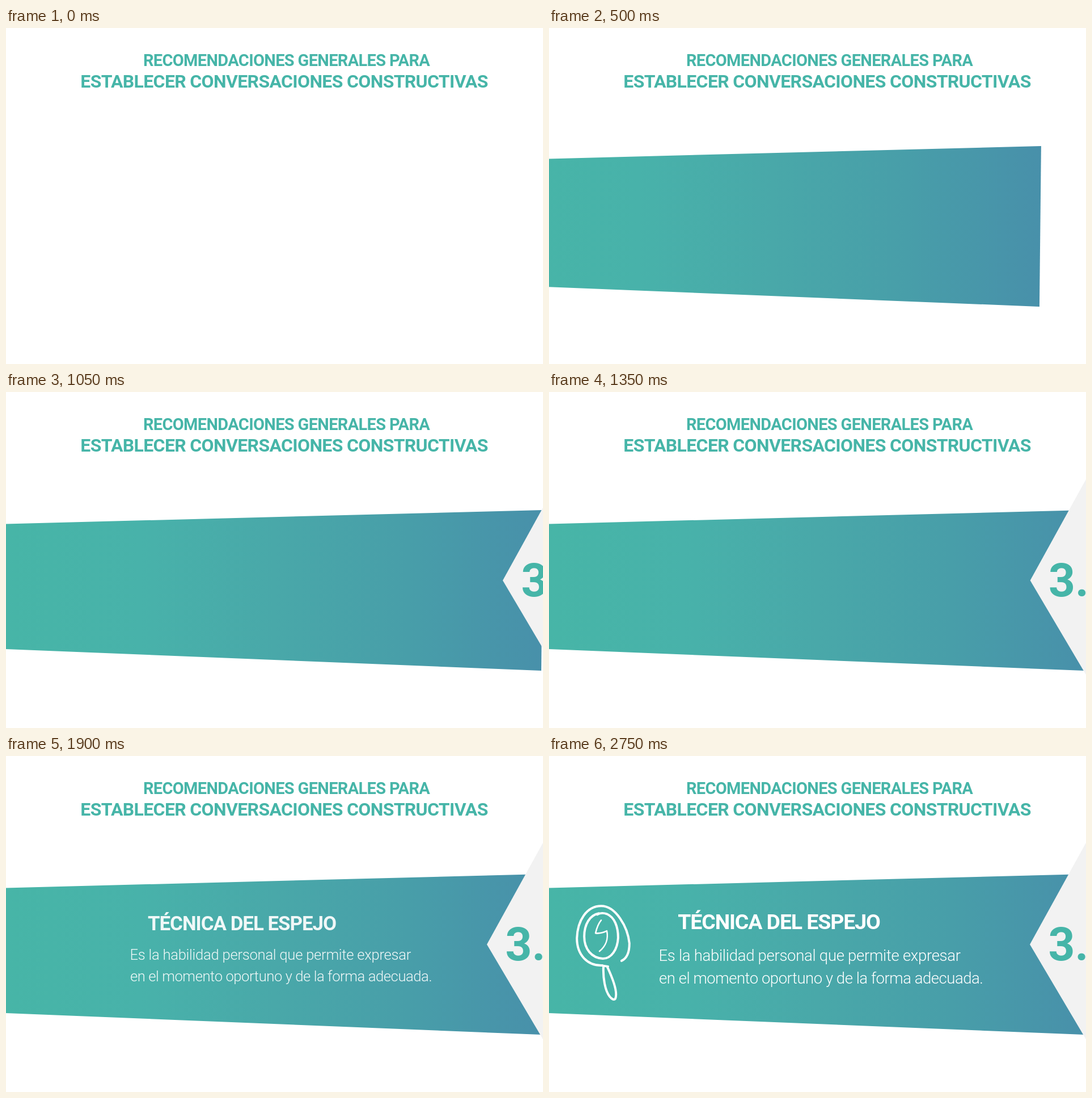
An HTML page for the animation above (2.8 s loop, 947 by 592 pixels).

```html
<!DOCTYPE html>
<html lang="es">
<head>
<meta charset="utf-8">
<title>Conversaciones constructivas</title>
<style>
  html, body { margin: 0; width: 100%; height: 100%; overflow: hidden; background: #fff; }
  svg { display: block; width: 100vw; height: 100vh; }
  text { font-family: Roboto, Inter, sans-serif; }
  .bold { font-weight: 700; text-anchor: middle; }
  .title { letter-spacing: -.041em; }
  .subtitle { letter-spacing: -.03em; }
  .teal { fill: #46b5a8; }
  .body { font-weight: 350; font-size: 27.5px; }
  .icon { fill: none; stroke: #fff; stroke-width: 4; stroke-linecap: round; stroke-linejoin: round; }
</style>
</head>
<body>
<svg viewBox="0 0 947 592">
  <defs>
    <linearGradient id="sea" gradientUnits="userSpaceOnUse" x1="0" y1="0" x2="947" y2="0">
      <stop offset="0" stop-color="#47b5a7"/>
      <stop offset=".25" stop-color="#48b2aa"/>
      <stop offset=".5" stop-color="#49a8a9"/>
      <stop offset=".75" stop-color="#489ea9"/>
      <stop offset="1" stop-color="#4890aa"/>
    </linearGradient>
  </defs>

  <g class="bold title teal">
    <text x="494.5" y="66.5" font-size="29">RECOMENDACIONES GENERALES PARA</text>
    <text x="490.5" y="104.5" font-size="32">ESTABLECER CONVERSACIONES CONSTRUCTIVAS</text>
  </g>

  <path id="banner" fill="url(#sea)" d="M-22 233 947 208 944 491-22 452.2Z"/>

  <g id="copy" fill="#fff">
    <text class="bold subtitle" x="405.5" y="304.5" font-size="37.5">TÉCNICA DEL ESPEJO</text>
    <text class="body" x="193.5" y="361" letter-spacing="-.28">Es la habilidad personal que permite expresar</text>
    <text class="body" x="194" y="401" letter-spacing="-.46">en el momento oportuno y de la forma adecuada.</text>
  </g>

  <g id="mirror" class="icon">
    <path d="M94 369C68 370 49 351 49 321C50 290 66 264 92 264C118 264 139 301 142 330C142 346 137 357 128 361"/>
    <path d="M85 279C90 276 97 276 102 278C116 284 122 301 122 320C121 341 110 357 95 357C75 356 62 340 62 318C62 296 72 280 88 277"/>
    <path stroke-width="2.6" d="M92 289C87 295 84 303 82 312C89 313 96 311 102 308C105 322 100 335 89 344"/>
    <path d="M91 369 104 371M96 371C95 392 99 414 107 424C111 429 115 431 117 428C121 419 117 402 103 372"/>
  </g>

  <g id="arrow">
    <path fill="#f2f2f2" d="M848 332 948 151V501Z"/>
    <text class="teal" x="880.5" y="359.5" font-size="82" font-weight="700">3.</text>
  </g>
</svg>
<script>
  const LOOP = 2800, PHASE = 700, STEP = 50;
  const $ = id => document.getElementById(id);
  const [banner, arrow, copy, mirror] = ['banner', 'arrow', 'copy', 'mirror'].map($);

  // quadratic ease-out within the n-th phase
  const ease = (t, n) => {
    const u = Math.min(1, Math.max(0, t / PHASE - n));
    return 1 - (1 - u) ** 2;
  };

  const slide = (el, dist, p) =>
    el.setAttribute('transform', `translate(${dist * (1 - p)} 0)`);

  const zoom = (el, x, y, p) => {
    const s = .165 + .835 * p;
    el.setAttribute('transform', `translate(${x} ${y}) scale(${s}) translate(${-x} ${-y})`);
    el.setAttribute('opacity', p);
  };

  function draw(now) {
    let t = Math.floor(now % LOOP / STEP) * STEP;
    if (t < 100) t = 0; // opening hold
    slide(banner, -969, ease(t, 0));
    slide(arrow, 112, ease(t, 1));
    zoom(copy, 560, 339, ease(t, 2));
    zoom(mirror, 95.5, 347, ease(t, 3));
  }

  let start;
  function tick(now) {
    start ??= now;
    draw(now - start);
    requestAnimationFrame(tick);
  }
  draw(0);
  requestAnimationFrame(tick);
</script>
</body>
</html>
```
